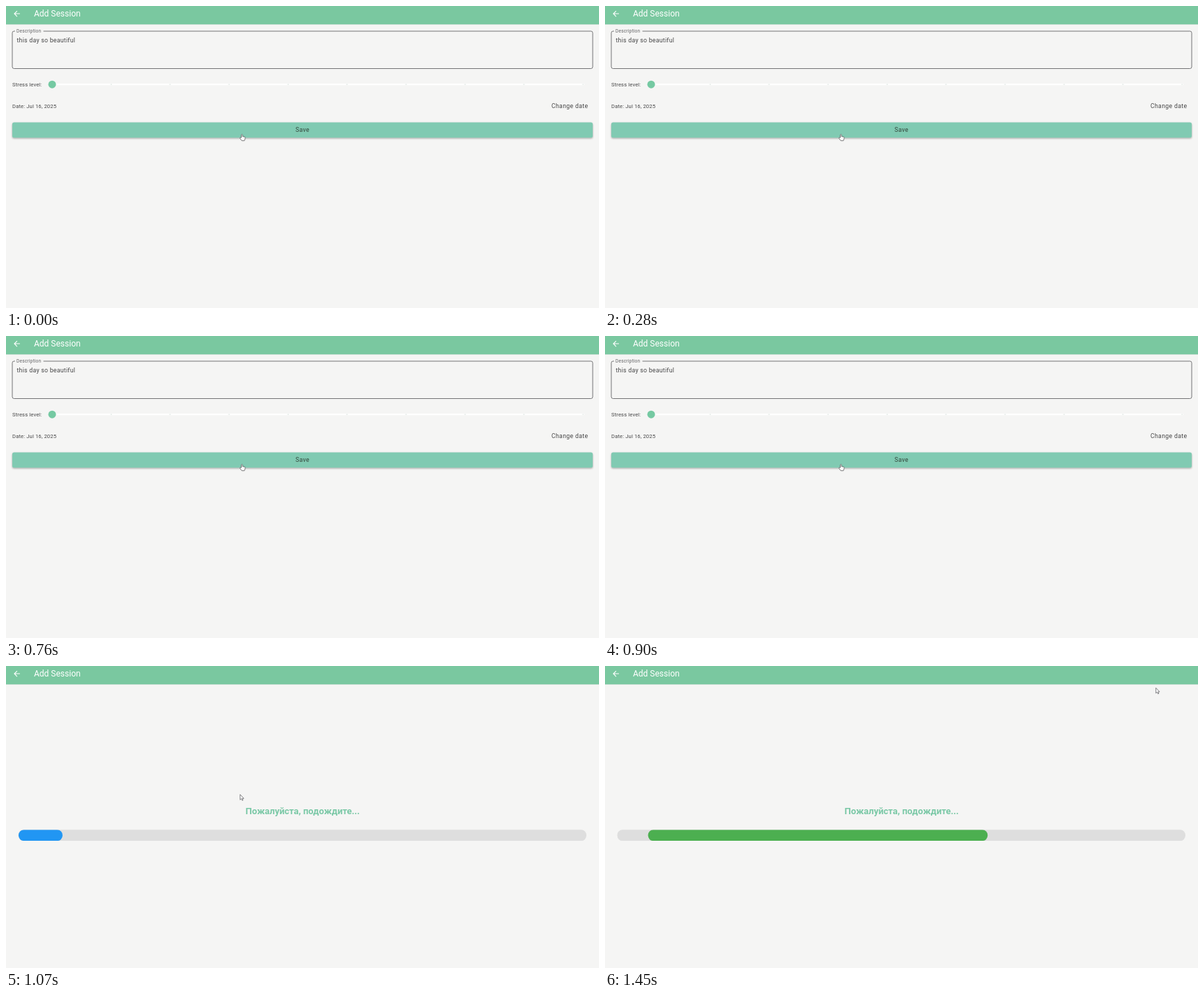
Recreate the animation shown at these times as an HTML page. Size 848 px wide and 432 px high, loop 1.49 s.

```html
<!DOCTYPE html>
<html lang="en">
<head>
<meta charset="utf-8">
<title>Add Session</title>
<style>
  html, body { margin: 0; width: 100%; height: 100%; overflow: hidden; background: #f5f5f4; }
  svg { display: block; width: 848px; height: 432px; font-family: Roboto, sans-serif; fill: #484849; }
  .body { font-size: 8.73px; letter-spacing: .27px; }
  .small { font-size: 7.64px; letter-spacing: .136px; }
  .label { font-size: 8.73px; letter-spacing: .32px; }
</style>
</head>
<body>
<svg viewBox="0 0 848 432">
  <defs>
    <filter id="shadow" x="-2%" y="-30%" width="104%" height="180%">
      <feDropShadow dx="0" dy="1.2" stdDeviation="1" flood-color="#333" flood-opacity=".45"/>
    </filter>
    <clipPath id="track"><rect x="17.5" y="234.3" width="812.5" height="15.8" rx="7.5"/></clipPath>
  </defs>
  <rect width="848" height="432" fill="#f5f5f4"/>
  <rect width="848" height="26" fill="#7ac8a0"/>
  <rect y="26" width="848" height="1" fill="#c9dfd3"/>
  <path fill="#fff" transform="translate(9 4.5) scale(.545)" d="M20 11H7.83l5.59-5.59L12 4l-8 8 8 8 1.41-1.41L7.83 13H20z"/>
  <text x="40" y="15.2" font-size="12" fill="#fff">Add Session</text>

  <g id="form">
    <path fill="none" stroke="#747476" d="M53.5 36H836.5a2.5 2.5 0 0 1 2.5 2.5V87a2.5 2.5 0 0 1-2.5 2.5H11.5A2.5 2.5 0 0 1 9 87V38.5A2.5 2.5 0 0 1 11.5 36H13"/>
    <text x="15" y="38.2" font-size="6.54" letter-spacing=".2" fill="#646466">Description</text>
    <text class="body" x="15.5" y="52">this day so beautiful</text>
    <text class="small" x="9" y="114.8">Stress level:</text>
    <rect x="66" y="111" width="761" height="2.2" rx="1.1" fill="#fff"/>
    <g id="ticks" fill="#b4c6bc"></g>
    <circle cx="66" cy="112.2" r="5.5" fill="#75c9a2"/>
    <text class="small" x="9" y="146.2">Date: Jul 16, 2025</text>
    <text class="label" x="780" y="146.3">Change date</text>
    <rect x="9" y="166.5" width="830" height="21.8" rx="2.5" fill="#80cab2" filter="url(#shadow)"/>
    <text class="label" x="414" y="180.1" fill="#34473c">Save</text>
    <path fill="#fff" stroke="#58585a" stroke-width=".8" stroke-linejoin="round" d="M336.6 188.2V184.1q.8-1.3 1.6 0V186.6l3 .6q1 .3.9 1.3l-.5 2.4-.7 1.8h-3.7l-2.6-3.5q-.1-1.3 1.1-1z"/>
  </g>

  <g id="wait">
    <text x="424.2" y="212.2" font-size="13" text-anchor="middle" font-weight="600" fill="#7ac8a6">Пожалуйста, подождите...</text>
    <g clip-path="url(#track)">
      <rect x="17" y="234" width="814" height="17" fill="#dedede"/>
      <rect id="fill" y="234.3" height="15.8" rx="7.5"/>
    </g>
    <path id="arrow" fill="#fff" stroke="#646468" stroke-width=".8" stroke-linejoin="round" d="M0 0V7.6L1.8 6 3 8.6 4.2 8 3.1 5.6H5.3z"/>
  </g>
</svg>
<script>
  // The screen is sampled at 30 fps and played back slightly slower.
  const LOOP = 1490, STEP = 34.6, LEAD = 8, LAST = 42, TICK = 100 / 3;
  const WAIT_STEP = 28, GREEN_STEP = 39, MOVE_STEP = 36;
  const BAR_X = 18, BAR_W = 812;
  const $ = id => document.getElementById(id);
  const clamp = v => Math.min(1, Math.max(0, v));

  $('ticks').innerHTML = Array.from({ length: 9 }, (_, i) =>
    `<circle cx="${150.3 + i * 84.35}" cy="112.1" r=".55"/>`).join('');

  // Cubic easing whose control points have y = 0 and y = 1.
  function ease(x, x1, x2) {
    let lo = 0, hi = 1;
    for (let i = 0; i < 24; i++) {
      const s = (lo + hi) / 2, r = 1 - s;
      if (3 * x1 * s * r * r + 3 * x2 * s * s * r + s ** 3 < x) lo = s; else hi = s;
    }
    return lo * lo * (3 - 2 * lo);
  }

  function draw(t) {
    const step = Math.min(LAST, Math.floor((t + LEAD) / STEP));
    const waiting = step >= WAIT_STEP;
    $('form').style.display = waiting ? 'none' : '';
    $('wait').style.display = waiting ? '' : 'none';
    if (!waiting) return;

    const ms = Math.max(TICK / 2, (step - WAIT_STEP) * TICK);
    const head = ease(clamp(ms / 750), .2, .8);
    const tail = ease(clamp((ms - 333) / 750), .4, 1);
    $('fill').setAttribute('x', BAR_X + BAR_W * tail);
    $('fill').setAttribute('width', BAR_W * (head - tail));
    $('fill').setAttribute('fill', step < GREEN_STEP ? '#2196f3' : '#4caf50');

    const m = ease(clamp((step - MOVE_STEP) / (LAST - MOVE_STEP)), 1 / 3, 2 / 3);
    $('arrow').setAttribute('transform', `translate(${334.8 + 453 * m} ${183.8 - 152.5 * m})`);
  }

  const start = performance.now();
  function tick() {
    draw((performance.now() - start) % LOOP);
    requestAnimationFrame(tick);
  }
  tick();
</script>
</body>
</html>
```
